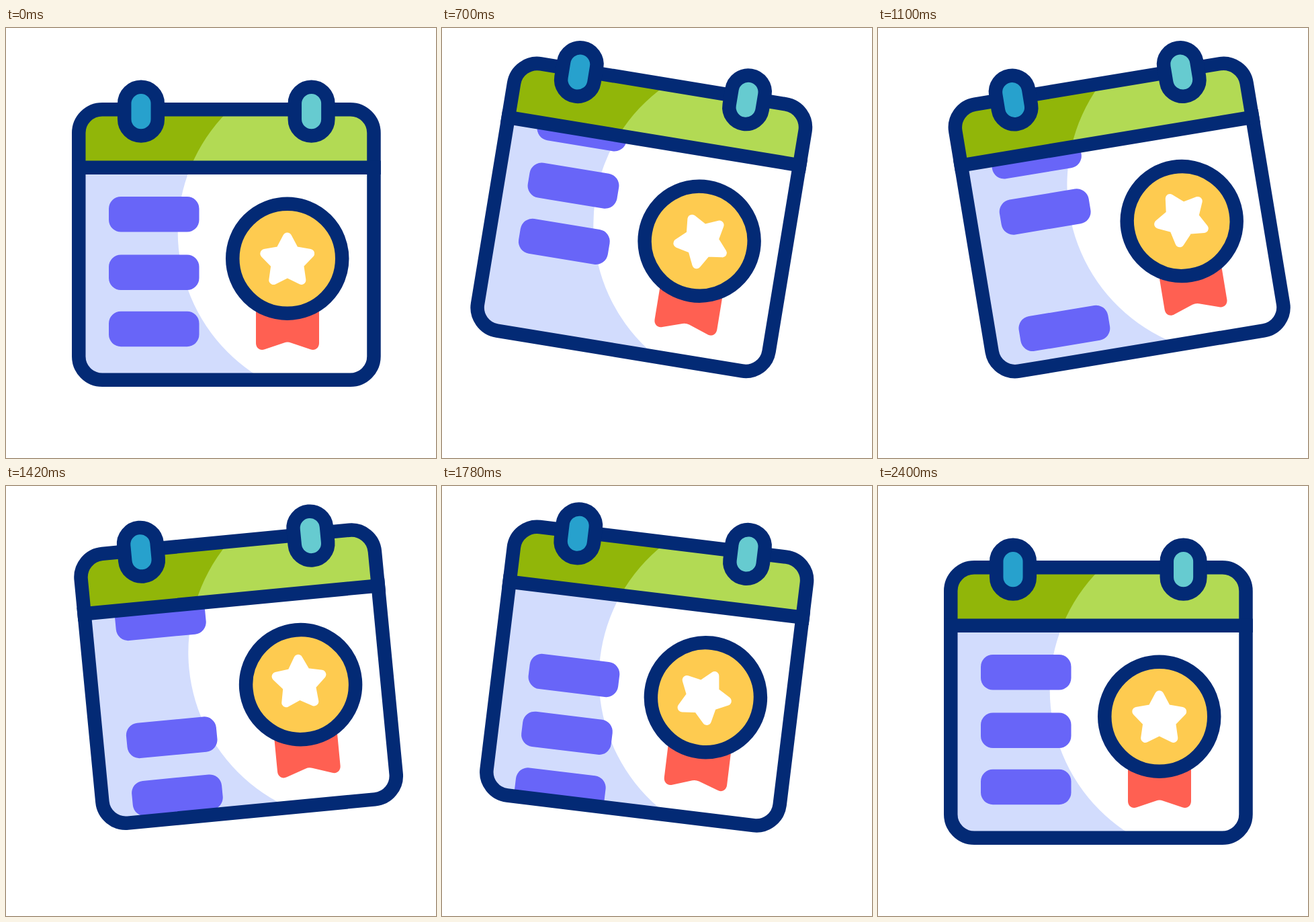
These frames come from a looping animation (640x640 px, 2.42 s). An HTML page:

```html
<!DOCTYPE html>
<html lang="en">
<head>
<meta charset="utf-8">
<title>Calendar award</title>
<style>
html, body { margin: 0; width: 100%; height: 100%; overflow: hidden; background: #fff; }
svg { display: block; width: 100vw; height: 100vh; }
</style>
</head>
<body>
<svg viewBox="0 0 640 640">
  <defs>
    <clipPath id="inside"><rect x="108.25" y="121.25" width="439.25" height="402.5" rx="35"/></clipPath>
    <clipPath id="page"><rect x="108" y="208" width="440" height="316"/></clipPath>
    <g id="bars" fill="#6865f8">
      <rect x="153" y="251" width="134.5" height="52.5" rx="18"/>
      <rect x="153" y="337.5" width="134.5" height="52.5" rx="18"/>
      <rect x="153" y="421.7" width="134.5" height="52.5" rx="18"/>
    </g>
  </defs>
  <g id="calendar">
    <g clip-path="url(#inside)">
      <rect x="98" y="111" width="460" height="423" fill="#d2dcfd"/>
      <circle cx="508.7" cy="303.4" r="253" fill="#fff"/>
      <svg x="98" y="111" width="460" height="97" viewBox="98 111 460 97">
        <rect x="98" y="111" width="460" height="97" fill="#91b609"/>
        <circle cx="508.7" cy="303.4" r="253" fill="#b2da54"/>
      </svg>
      <g clip-path="url(#page)">
        <g id="scroll">
          <use href="#bars"/>
          <use href="#bars" y="346.5"/>
        </g>
      </g>
    </g>
    <path fill="#ff6052" d="M372 400V469C372 476 378 481 385 478.3L414 468.4Q419 466.7 424 468.4L453 478.3C460 481 466 476 466 469V400Z"/>
    <g fill="none" stroke="#032a75" stroke-width="20.5">
      <rect x="108.25" y="121.25" width="439.25" height="402.5" rx="35"/>
      <path d="M98 207.7H557.9"/>
      <rect x="176.2" y="87.7" width="49.6" height="72.8" rx="24.8" fill="#27a1cd"/>
      <rect x="429.8" y="87.7" width="49.6" height="72.8" rx="24.8" fill="#66cbd0"/>
      <circle cx="418.75" cy="343.25" r="81.5" fill="#fecb50"/>
    </g>
    <path id="star" fill="#fff" stroke="#fff" stroke-width="13.4" stroke-linejoin="round"/>
  </g>
</svg>
<script>
const LOOP = 2420, END = 2400;
const [calendar, scroll, star] = ['calendar', 'scroll', 'star'].map(id => document.getElementById(id));

// Eased progress from time a to time b
function ease(t, a, b) {
  const u = Math.min(1, Math.max(0, (t - a) / (b - a)));
  return u * u * (3 - 2 * u);
}

function starPath(cx, cy, outer, inner) {
  const points = Array.from({ length: 10 }, (_, i) => {
    const r = i % 2 ? inner : outer, a = i * Math.PI / 5;
    return (cx + r * Math.sin(a)).toFixed(2) + ' ' + (cy - r * Math.cos(a)).toFixed(2);
  });
  return 'M' + points.join('L') + 'Z';
}

function draw(t) {
  const tilt = 11 * ease(t, 0, 600) - 22 * ease(t, 600, 1200)
    + 18 * ease(t, 1200, 1800) - 7 * ease(t, 1800, END);
  const lift = 38 * (ease(t, 0, 600) - ease(t, 1800, END));
  calendar.setAttribute('transform', `translate(0 ${-lift}) rotate(${tilt} 328 131)`);
  scroll.setAttribute('transform', `translate(0 ${-346.5 * ease(t, 0, END)})`);
  star.setAttribute('transform', `rotate(${-360 * t / END} 418.75 343.25)`);
}

function tick() {
  draw(Math.min(performance.now() % LOOP, END));
  requestAnimationFrame(tick);
}

star.setAttribute('d', starPath(418.75, 346.6, 35.5, 18.5));
tick();
</script>
</body>
</html>
```
